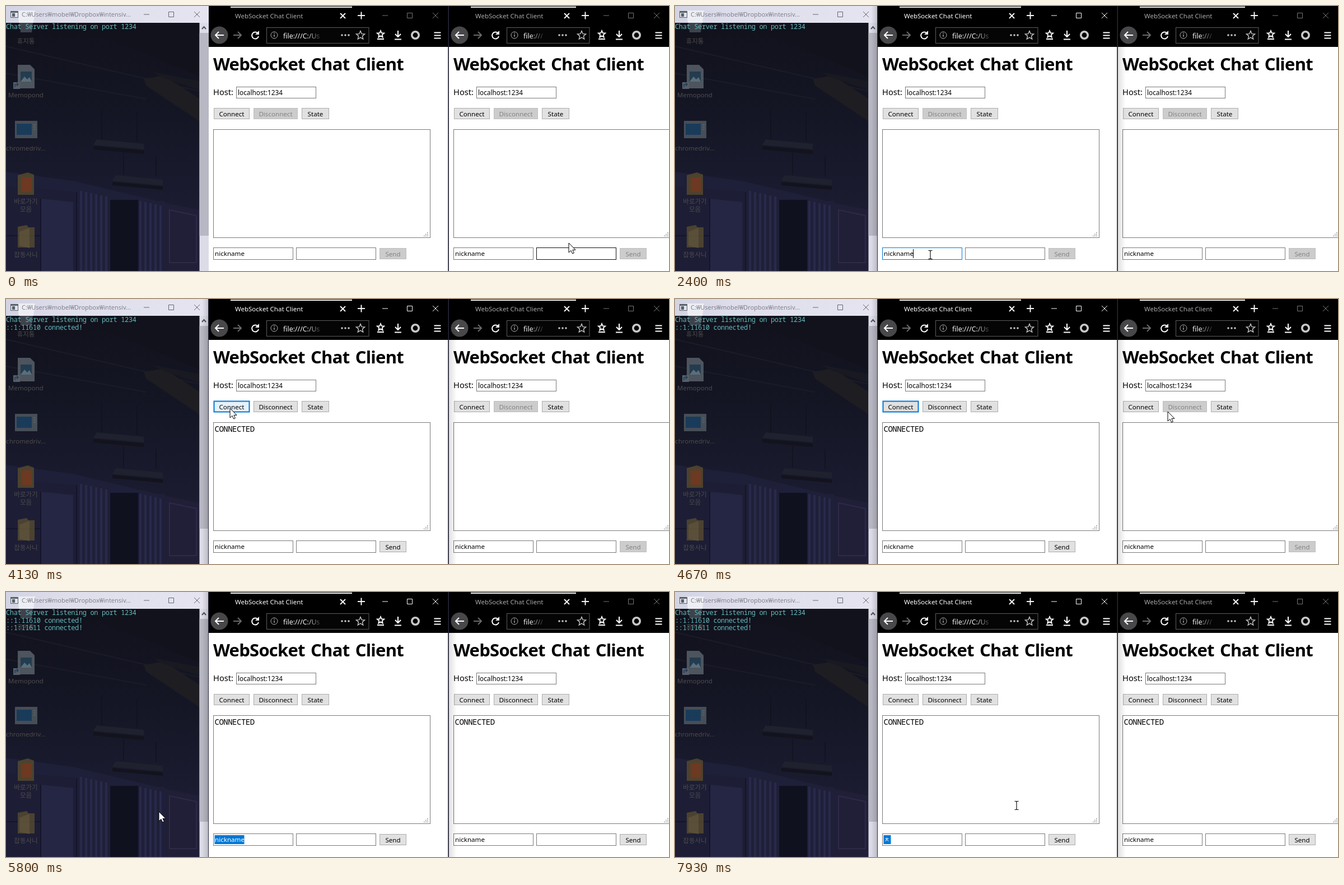
Animation of 1184x473 px, one loop 8000 ms. Source, as an HTML page:

```html
<!DOCTYPE html>
<html lang="ko">
<head>
<meta charset="utf-8">
<title>WebSocket Chat Client</title>
<style>
html, body { margin: 0; width: 100%; height: 100%; overflow: hidden; background: #000; }
svg { display: block; width: 100vw; height: 100vh; font-family: "Noto Sans", "Open Sans", "Noto Sans CJK KR", sans-serif; }
text { white-space: pre; }
.mono { font-family: "Noto Sans Mono", "Noto Sans CJK KR", monospace; font-weight: 300; }
.label { fill: #4d4b4c; text-anchor: middle; }
.win .cap { fill: #aaaaac; }
.win .ctl { stroke: #77777a; }
.win.active .cap { fill: #fff; }
.win.active .ctl { stroke: #fff; }
#con .cap { fill: #82828c; }
#con .ctl { stroke: #66666f; }
#con.active .cap { fill: #111; }
#con.active .ctl { stroke: #111; }
.field { fill: #fff; stroke: #7a7a7a; }
.field.hot { stroke: #111; }
.field.focus.hot { stroke: #0078d7; }
.btn rect { fill: #e1e1e1; stroke: #adadad; }
.btn text { text-anchor: middle; }
.btn.hot rect { fill: #e5f1fb; stroke: #0078d7; }
.btn.focus rect { stroke: #0078d7; stroke-width: 2; }
.btn.off rect { fill: #ccc; stroke: #bfbfbf; stroke-width: 1; }
.btn.off text { fill: #838383; }
.hide { display: none; }
</style>
</head>
<body>
<svg id="stage" viewBox="0 0 1184 473" preserveAspectRatio="none"></svg>
<script>
const TICK = 200 / 3, LOOP = 8000;
const spots = [];

const text = (x, y, size, str, attrs = '') => `<text x="${x}" y="${y}" font-size="${size}" ${attrs}>${str}</text>`;
const rect = (x, y, w, h, fill, attrs = '') => `<rect x="${x}" y="${y}" width="${w}" height="${h}" fill="${fill}" ${attrs}/>`;
const line = (d, color, w = 1, attrs = '') => `<path d="${d}" fill="none" stroke="${color}" stroke-width="${w}" ${attrs}/>`;
const shape = (d, fill) => `<path d="${d}" fill="${fill}"/>`;
const ramp = (id, x1, x2, y1, y2, ...stops) =>
  `<linearGradient id="${id}" gradientUnits="userSpaceOnUse" x1="${x1}" x2="${x2}" y1="${y1}" y2="${y2}">` +
  stops.map(([o, c, a = 1]) => `<stop offset="${o}" stop-color="${c}" stop-opacity="${a}"/>`).join('') + '</linearGradient>';

function field(id, x, y, w, h, value = '', size = 11.6) {
  spots.push({ id, x, y, w, h, typed: true });
  return `<rect id="${id}" class="field" x="${x + .5}" y="${y + .5}" width="${w - 1}" height="${h - 1}"/>` +
    text(x + 3, y + 15, size, value, `id="${id}Text"`);
}

function button(id, x, y, w, label) {
  spots.push({ id, x, y, w, h: 20 });
  return `<g id="${id}" class="btn"><rect x="${x + .5}" y="${y + .5}" width="${w - 1}" height="19"/>` +
    text(x + w / 2, y + 14.5, 11.6, label) + '</g>';
}

// Caption buttons: minimise, maximise, close
const controls = (x, y) =>
  line(`M${x - 5} ${y}h10M${x + 39.5} ${y - 4.5}h9v9h-9zM${x + 85} ${y - 5}l10 10m0-10l-10 10`, '', 1, 'class="ctl"');

const star = (x, y, r) => 'M' + Array.from({ length: 10 }, (_, i) => {
  const a = i * Math.PI / 5 - Math.PI / 2, q = i % 2 ? r * .45 : r;
  return (x + q * Math.cos(a)).toFixed(1) + ' ' + (y + q * Math.sin(a)).toFixed(1);
}).join('L') + 'Z';

function curtain(x, y, n) {
  let s = rect(x, y, n * 9, 473 - y, '#1f2038');
  for (let i = 0; i < n; i++) s += rect(x + i * 9, y + i * 2, 4, 473 - y, '#28294a');
  return s;
}

function desktop() {
  let s = rect(0, 0, 362, 473, 'url(#night)');
  s += shape('M0 30H346V126L150 44L0 36Z', '#11121b') + shape('M0 296L120 312L346 366V473H0Z', '#1e1f38');
  s += line('M0 72L346 152M0 120L250 166', '#1b1c28', 2);
  s += shape('M246 130L282 124L346 166V206L250 142Z', '#1e1d22') + shape('M262 118L346 134V150L280 128Z', '#191921');
  s += line('M171 184V240M234 190V242M210 262V302M268 268V304', '#0f1018');
  for (const [x, y] of [[156, 238], [190, 302]])
    s += shape(`M${x + 6} ${y}l84 8v10l-90-8z`, '#20212f') + shape(`M${x} ${y + 12}l90 8v6l-90-8z`, '#12131c');
  s += shape('M0 322L126 332V473H0Z', '#1d1e35') + shape('M62 344L120 350V473H62Z', '#252643');
  s += line('M62 344V473M126 332V473M0 410H62', '#14152a', 2);
  s += curtain(132, 330, 6) + rect(186, 346, 50, 127, '#10111f') + curtain(238, 348, 5);
  s += shape('M286 352L346 364V473H286Z', '#211f38') + line('M292 364L340 374V458H292Z', '#2c2a46', 2);

  s += '<g opacity=".8">' + shape('M24 30H48L46 47H26Z', '#4a4f58');
  s += shape('M21 105h22l8 8v34H21z', '#5c656d') + rect(26, 117, 20, 18, '#27465c') + shape('M26 135l7-9 5 5 4-4 4 8z', '#6d8590');
  s += rect(13, 136, 12, 12, '#69717a') + line('M16 145v-5h6m-3-3l3 3-3 3', '#24476a', 1.5);
  s += rect(16, 205, 40, 31, '#535c63') + rect(19, 210, 27, 20, '#1b4568') + line('M49 212h4m-4 4h4m-4 4h4', '#7b8388');
  s += shape('M21 302l18-5 11 4v36H21z', '#584b2d') + rect(28, 306, 18, 26, '#81401d');
  s += shape('M21 394l16-3 3 4h11v36H21z', '#574c31') + shape('M24 403l18-7v36l-18-4z', '#6a5c3a') + '</g>';
  const names = [[67, '휴지통'], [163, 'Memopond'], [258, 'chromedriv...'], [353, '바로가기'], [367, '모음'], [448, '잡동사니']];
  return s + names.map(([y, n]) => text(35.5, y, 11.5, n, 'class="label"')).join('');
}

function terminal() {
  const out = (y, str, id) => text(0, y, 12, str, `id="${id}" class="mono" fill="#63b9bd" letter-spacing="-.36"`);
  return '<g id="con">' + rect(0, 0, 362, 30, 'url(#bar)') +
    shape('M20 8H52L49 30H23Z', '#eceef4') +
    rect(8, 9, 14, 12, '#59606a') + rect(9, 12, 12, 8, '#dfe3e8') + rect(11, 13, 5, 6, '#59606a') +
    text(28, 19, 11, 'C:₩Users₩mobel₩Dropbox₩intensiv...', 'class="cap"') + controls(251, 15) +
    rect(345.5, 30, 16.5, 443, '#dcdce8') + rect(345.5, 48, 16.5, 362, '#b8b8c4') +
    line('M350 41l3.5-4 3.5 4', '#50505c', 2) +
    out(41, 'Chat Server listening on port 1234', 'log0') + out(54.7, '::1:11610 connected!', 'log1') +
    out(68.3, '::1:11611 connected!', 'log2') + rect(0, 53, 7, 4, '#d8d8d8', 'id="conCaret"') + '</g>';
}

// dx moves the page, rx the right-aligned tools, tx the tab end
function browser(id, dx, rx, tx, end, urlEnd) {
  const x = n => n + dx, r = n => n + rx, left = x(362);
  let s = rect(left, 0, end - left, 73, '#000') + rect(left, 73, end - left, 400, '#fff');
  s += rect(x(401), 1, 217 + tx - dx, 2, '#f4f4f4') + text(x(409), 22, 11.5, 'WebSocket Chat Client', 'class="cap"');
  s += line(`M${597 + tx} 13l9 9m0-9l-9 9M${628 + tx} 17h13m-6.5-6.5v13`, '#f4f4f4', 2) + controls(r(677), 17);

  s += `<circle cx="${x(381)}" cy="52" r="15.5" fill="#48484b"/>` + line(`M${x(389)} 52h-15m6-6l-6 6 6 6`, '#fff', 2);
  s += line(`M${x(406)} 52h14m-6-6l6 6-6 6`, '#6a6a6c', 2);
  s += line(`M${x(450)} 49a6 6 0 1 0 1 5`, '#fff', 2) + shape(`M${x(452)} 44v7h-7z`, '#fff');
  const boxEnd = r(648) + (rx < dx ? -1 : 0);
  s += rect(x(465.5), 38.5, boxEnd - x(465.5), 28, '#050506', 'stroke="#5c5c5e"');
  s += `<circle cx="${x(479)}" cy="52" r="6" fill="none" stroke="#b0b0b2"/>` + line(`M${x(479)} 51v4m0-7v1.5`, '#b0b0b2', 1.4);
  s += ramp(id + 'Fade', urlEnd - 28, urlEnd, 0, 0, [0, '#f4f4f4'], [1, '#f4f4f4', 0]);
  s += text(x(495), 57.5, 12.4, dx ? 'file:///' : 'file:///C:/Us', `fill="url(#${id}Fade)"`);
  const dots = dx ? 994 : 606;
  for (const d of [-6, 0, 6]) s += `<circle cx="${dots + d}" cy="52" r="1.8" fill="#c4c4c6"/>`;
  s += line(star(r(633), 52.5, 8), '#c4c4c6', 1.4);
  s += line(star(r(669), 50.5, 6.5), '#fff', 1.8) + line(`M${r(663)} 59h12`, '#fff', 2);
  s += line(`M${r(700)} 44v11m-5-5l5 5 5-5M${r(694)} 59.5h12`, '#fff', 2);
  s += `<circle cx="${r(731)}" cy="52" r="6.2" fill="none" stroke="#c9c9cb" stroke-width="3.6"/>`;
  s += line(`M${r(764.5)} 47.5h12m-12 5h12m-12 5h12`, '#fff', 2);

  s += text(x(370), 115, 31, 'WebSocket Chat Client', 'font-weight="700" letter-spacing="-.75" word-spacing="3"') + text(x(370), 159, 14.7, 'Host:');
  s += field(id + 'Host', x(411), 144, 143, 21, 'localhost:1234', 11.8);
  s += button(id + 'Connect', x(371), 182, 64, 'Connect') + button(id + 'Disconnect', x(442), 182, 79, 'Disconnect');
  s += button(id + 'State', x(528), 182, 49, 'State');
  spots.push({ x: x(370), y: 220, w: 388, h: 193, typed: true }, { x: x(370), y: 88, w: 340, h: 32, typed: true });
  s += rect(x(370.5), 220.5, 387, 193, '#fff', 'stroke="#7a7a7a"');
  s += text(x(372.5), 236.5, 14, 'CONNECTED', `id="${id}Chat" class="mono" letter-spacing="-.5"`);
  s += line(`M${x(746)} 410.5h9m-6-3h6m-3-3h3`, '#8c8c8c', 1.6, 'stroke-dasharray="1.6 1.5"');
  s += field(id + 'Nick', x(370), 431, 143, 22, 'nickname') + field(id + 'Msg', x(518), 431, 143, 22);
  s += button(id + 'Send', x(667), 432, 48, 'Send');
  return `<g id="${id}" class="win">${s}</g>`;
}

const stage = document.getElementById('stage');
stage.innerHTML = '<defs>' +
  ramp('night', 0, 0, 0, 473, [0, '#10111a'], [.5, '#161727'], [1, '#1f2039']) +
  ramp('bar', 0, 362, 0, 0, [0, '#d2d3e3'], [.3, '#dedeec'], [1, '#e5e4f0']) +
  ramp('shadeL', 350, 362, 0, 0, [0, '#000', 0], [1, '#000', .16]) +
  ramp('shadeR', 791, 805, 0, 0, [0, '#000', .12], [1, '#000', 0]) + '</defs>' +
  desktop() + terminal() + browser('a', 0, 0, 0, 789.5, 566) + browser('b', 429, 395, 400, 1184, 964) +
  rect(789.5, 0, 1.5, 473, '#27273e') +
  '<g id="shade">' + rect(350, 0, 12, 473, 'url(#shadeL)') + rect(361, 0, 1, 473, '#2b2b42') +
  rect(791, 0, 14, 473, 'url(#shadeR)') + '</g>' +
  rect(372.5, 434, 53, 16, '#0078d7', 'id="mark"') + text(373, 446, 11.6, '', 'id="typed" fill="#fff"') +
  rect(425, 434, 1, 16, '#000', 'id="caret"') +
  `<g id="arrow"><path d="M0 0V17L4 13.4L6.6 19L9.4 17.8L6.9 12.3H12Z" fill="#fff" stroke="#000"/></g>` +
  `<g id="beam">${line('M-3.5-7.5H-1L0-6.5L1-7.5H3.5M0-6.5V6.5M-3.5 7.5H-1L0 6.5L1 7.5H3.5', '#000', 1.1)}</g>`;

// Pointer path: tick, x, y
const path = [
  [0, 1005, 423], [4, 760, 380], [8, 330, 275], [10, 290, 258], [12, 290, 258], [16, 400, 190], [20, 483, 163],
  [25, 482, 156], [29, 440, 300], [32, 372, 418], [36, 456, 444], [38, 434, 443], [39, 405, 455], [40, 345, 330],
  [41, 315, 57], [43, 560, 300], [45, 673, 425], [47, 673, 425], [49, 674, 412], [52, 674, 412], [54, 520, 300],
  [56, 396, 222], [57, 396, 222], [58, 400, 195], [62, 400, 195], [66, 700, 215], [68, 905, 212], [70, 880, 201],
  [73, 835, 193], [77, 835, 193], [80, 640, 330], [83, 432, 443], [84, 425, 442], [86, 246, 425], [87, 273, 392],
  [89, 560, 384], [90, 610, 380], [94, 610, 380], [95, 610, 381], [120, 610, 381]
];
const input = [[105, 'ㅊ'], [106, '초'], [108, '촐'], [109, '초로'], [110, '초롱'], [115, '초롱'], [119, 'ㅊ']];

const el = id => document.getElementById(id);
const flag = (id, name, on) => el(id).classList.toggle(name, on);
const show = (id, on) => flag(id, 'hide', !on);
const within = (n, a, b) => n >= a && n < b;

function pointer(n) {
  const i = Math.max(1, path.findIndex(k => k[0] >= n));
  const [t0, x0, y0] = path[i - 1], [t1, x1, y1] = path[i];
  const p = (n - t0) / (t1 - t0);
  return [Math.round(x0 + (x1 - x0) * p), Math.round(y0 + (y1 - y0) * p)];
}

function typing(n) {
  const step = input.filter(k => k[0] <= n).pop();
  const marked = !!step || within(n, 40, 60) || within(n, 86, 105);
  const str = step ? step[1] : 'nickname';
  // Only the syllable being composed is marked until all is selected
  const from = step && str.length === 2 && n < 115 ? 11 : 0;
  show('aNickText', !step);
  show('typed', marked);
  show('mark', marked);
  el('typed').innerHTML = from ? `<tspan fill="#000">${str[0]}</tspan>${str[1]}` : str;
  el('mark').setAttribute('x', 372.5 + from);
  el('mark').setAttribute('width', step ? str.length * 11 + 2 - from : 53);
}

function render(n) {
  const [x, y] = pointer(n);
  let typed = false;
  for (const s of spots) {
    const over = x >= s.x && x <= s.x + s.w && y >= s.y && y <= s.y + s.h;
    if (s.id) flag(s.id, 'hot', over);
    if (over && s.typed) typed = true;
  }
  // The pointer has only just left this field
  flag('bMsg', 'hot', n < 1);
  show('arrow', !typed);
  show('beam', typed);
  el(typed ? 'beam' : 'arrow').setAttribute('transform', `translate(${x} ${y})`);

  const aOn = within(n, 25, 75) || n >= 84, bOn = within(n, 75, 84);
  flag('con', 'active', within(n, 9, 25));
  flag('a', 'active', aOn);
  flag('b', 'active', bOn);
  show('shade', aOn);
  show('conCaret', within(n, 13, 21));

  const joined = { a: n >= 61, b: n >= 76 };
  for (const w in joined) {
    show(w + 'Chat', joined[w]);
    flag(w + 'Disconnect', 'off', !joined[w]);
    flag(w + 'Send', 'off', !joined[w]);
  }
  show('log1', n >= 61);
  show('log2', n >= 76);
  flag('aHost', 'focus', within(n, 25, 35));
  flag('aNick', 'focus', within(n, 35, 60) || n >= 84);
  flag('aConnect', 'focus', within(n, 60, 75));
  flag('bConnect', 'focus', bOn);
  show('caret', within(n, 35, 40) || within(n, 84, 86));
  typing(n);
}

let last = -1;
function loop() {
  const n = Math.floor((performance.now() % LOOP + 4) / TICK) % 120;
  if (n !== last) render(last = n);
  requestAnimationFrame(loop);
}
loop();
</script>
</body>
</html>
```
